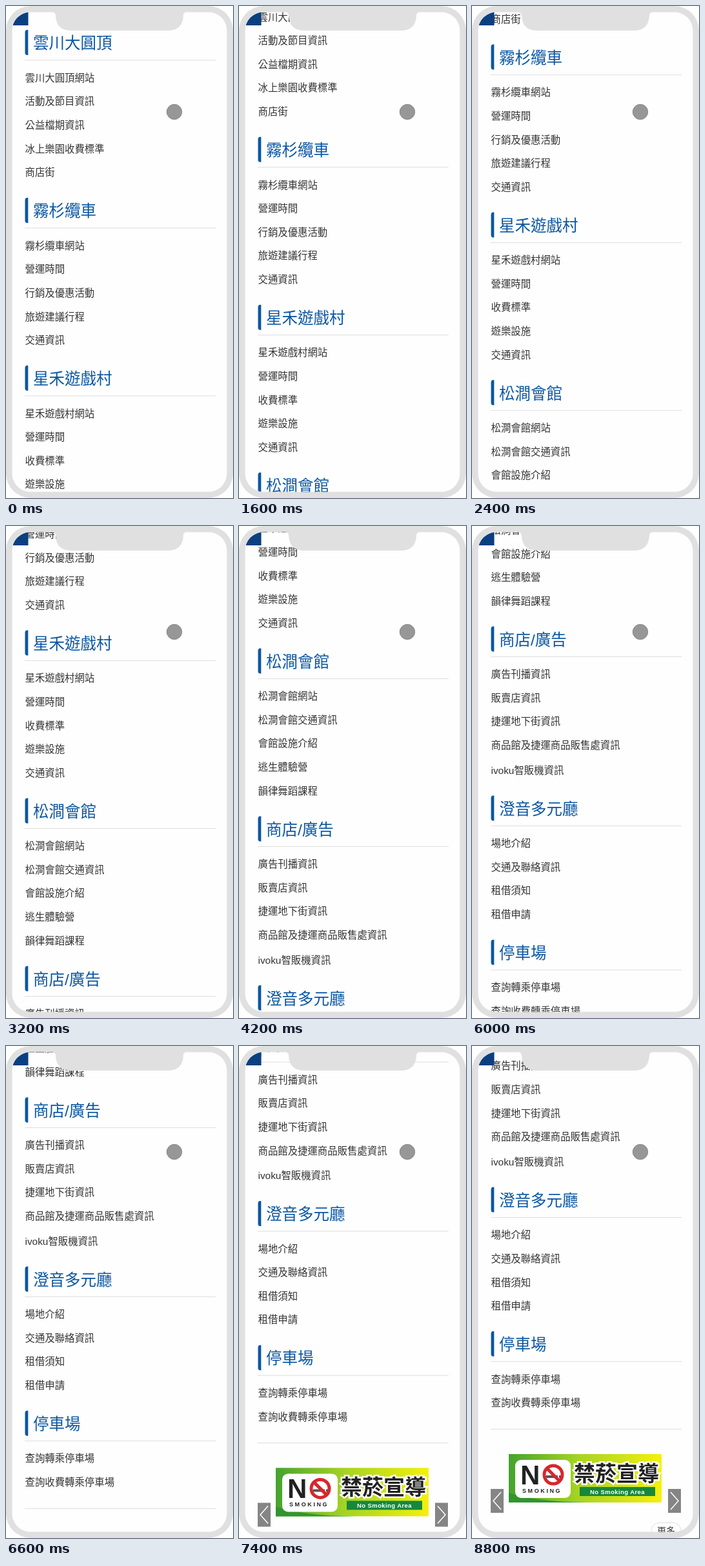
An HTML page for the animation above (8.9 s loop, 352 by 762 pixels).

```html
<!DOCTYPE html>
<html lang="zh-Hant">
<head>
<meta charset="utf-8">
<title>Scrolling menu</title>
<style>
  html, body { margin: 0; width: 100%; height: 100%; overflow: hidden; background: #fff; }
  svg { display: block; width: 100%; height: 100%; }
  text { font-family: "Liberation Sans", "Noto Sans CJK TC", "Noto Sans CJK", sans-serif; }
  .heading { font-size: 24.5px; fill: #0b57a3; }
  .item { font-size: 15.4px; fill: #333; }
  .bar { fill: #0b57a3; }
  .rule { fill: #dedede; }
</style>
</head>
<body>
<svg viewBox="0 0 352 762">
  <defs>
    <linearGradient id="lime">
      <stop offset="0" stop-color="#45a32f"/>
      <stop offset=".45" stop-color="#a5d322"/>
      <stop offset="1" stop-color="#f4f00c"/>
    </linearGradient>
    <clipPath id="screen"><rect x="9" y="9" width="334" height="744" rx="29"/></clipPath>
  </defs>
  <rect width="352" height="762" rx="38" fill="#fefefe"/>
  <g clip-path="url(#screen)">
    <g id="page">
      <g id="sections"></g>
      <g id="footer" transform="translate(0 1120)">
        <rect class="rule" x="29" y="593" width="296" height="1"/>
        <rect x="57" y="632" width="237" height="75" fill="url(#lime)"/>
        <path d="M57 707V692Q100 706 180 707Z" fill="#32952f"/>
        <rect x="67" y="641" width="86" height="59" rx="9" fill="#fff"/>
        <text x="75" y="679" font-size="42" font-weight="bold" fill="#222">N</text>
        <path d="M115 665h18v4h-18zM135 665h3v4h-3z" fill="#555"/>
        <g fill="none" stroke="#d8262c" stroke-width="5">
          <circle cx="126" cy="664" r="14"/>
          <path d="M116 654l20 20"/>
        </g>
        <text x="78" y="692" font-size="9" font-weight="bold" fill="#222" letter-spacing="2.6">SMOKING</text>
        <text x="158" y="674" font-size="33" font-weight="bold" fill="#222" stroke="#fff" stroke-width="5" paint-order="stroke">禁菸宣導</text>
        <rect x="167" y="683" width="117" height="14" fill="#16883c"/>
        <text x="225.5" y="693.5" font-size="9.5" font-weight="bold" fill="#fff" text-anchor="middle" letter-spacing=".4">No Smoking Area</text>
        <path d="M29 686h20v37h-20zM304 686h20v37h-20z" fill="#858585"/>
        <path d="M45 691L33 704.5L45 718M308 691L320 704.5L308 718" fill="none" stroke="#fff" stroke-width="1.5"/>
        <rect x="278.5" y="738.5" width="45" height="24" rx="11" fill="#fff" stroke="#ddd"/>
        <text x="301" y="755.5" font-size="14" fill="#333" text-anchor="middle">更多</text>
      </g>
    </g>
    <rect x="9" y="9" width="25.5" height="21" fill="#0a3f80"/>
  </g>
  <circle cx="261" cy="164" r="11.7" fill="#979797" stroke="#888"/>
  <path fill="#e0e0e0" fill-rule="evenodd" d="
    M38 0H314A38 38 0 0 1 352 38V724A38 38 0 0 1 314 762H38A38 38 0 0 1 0 724V38A38 38 0 0 1 38 0Z
    M38 9.5H71Q77 9.5 77 15Q78 38 101 38H251Q274 38 275 15Q275 9.5 281 9.5H314A28.5 28.5 0 0 1 342.5 38
    V724A28.5 28.5 0 0 1 314 752.5H38A28.5 28.5 0 0 1 9.5 724V38A28.5 28.5 0 0 1 38 9.5Z"/>
</svg>
<script>
const LOOP = 8900;
const ITEM_PITCH = 36.6;

const menu = [
  ["雲川大圓頂", "雲川大圓頂網站", "活動及節目資訊", "公益檔期資訊", "冰上樂園收費標準", "商店街"],
  ["霧杉纜車", "霧杉纜車網站", "營運時間", "行銷及優惠活動", "旅遊建議行程", "交通資訊"],
  ["星禾遊戲村", "星禾遊戲村網站", "營運時間", "收費標準", "遊樂設施", "交通資訊"],
  ["松澗會館", "松澗會館網站", "松澗會館交通資訊", "會館設施介紹", "逃生體驗營", "韻律舞蹈課程"],
  ["商店/廣告", "廣告刊播資訊", "販賣店資訊", "捷運地下街資訊", "商品館及捷運商品販售處資訊", "ivoku智販機資訊"],
  ["澄音多元廳", "場地介紹", "交通及聯絡資訊", "租借須知", "租借申請"],
  ["停車場", "查詢轉乘停車場", "查詢收費轉乘停車場"],
];

const label = (kind, x, y, text) => `<text class="${kind}" x="${x}" y="${y}">${text}</text>`;

// Each section is laid out from the vertical centre of its heading.
let centre = 57, markup = "";
for (const [title, ...items] of menu) {
  markup += `<path class="bar" d="M34.3 ${centre - 20}v39h-1.6q-3.2 0 -3.2 -4v-31q0 -4 3.2 -4z"/>`
    + label("heading", 42, centre + 9.3, title)
    + `<rect class="rule" x="29" y="${centre + 26.5}" width="296" height="1"/>`;
  let y = centre + 54;
  items.forEach((item, i) => {
    if (i) y += ITEM_PITCH;
    if (/^[a-z]/.test(item)) y += 2;   // mixed-script rows sit slightly lower
    markup += label("item", 29.5, y + 5.8, item);
  });
  centre = y + 59.5;
}
document.getElementById("sections").innerHTML = markup;

// Scroll offset over time: monotone cubic through [ms, px], at rest at both ends.
const knots = [[1000, 0], [1600, 94], [3200, 395], [4200, 627], [5300, 819.5], [6600, 997], [7800, 1120]];
const slope = i => (knots[i + 1][1] - knots[i][1]) / (knots[i + 1][0] - knots[i][0]);
const tangents = knots.map((_, i) => {
  if (i === 0 || i === knots.length - 1) return 0;
  const before = slope(i - 1), after = slope(i);
  return 2 * before * after / (before + after);
});

function scrollAt(time) {
  if (time <= knots[0][0]) return 0;
  const end = knots.findIndex(([t]) => time < t);
  if (end < 0) return knots[knots.length - 1][1];
  const [t0, p0] = knots[end - 1], [t1, p1] = knots[end];
  const span = t1 - t0, u = (time - t0) / span, v = 1 - u;
  return p0 * v * v * (1 + 2 * u) + p1 * u * u * (3 - 2 * u)
    + span * u * v * (tangents[end - 1] * v - tangents[end] * u);
}

const page = document.getElementById("page");
const start = performance.now();
function draw() {
  const time = (performance.now() - start) % LOOP;
  page.setAttribute("transform", `translate(0 ${-scrollAt(time).toFixed(2)})`);
  requestAnimationFrame(draw);
}
draw();
</script>
</body>
</html>
```
